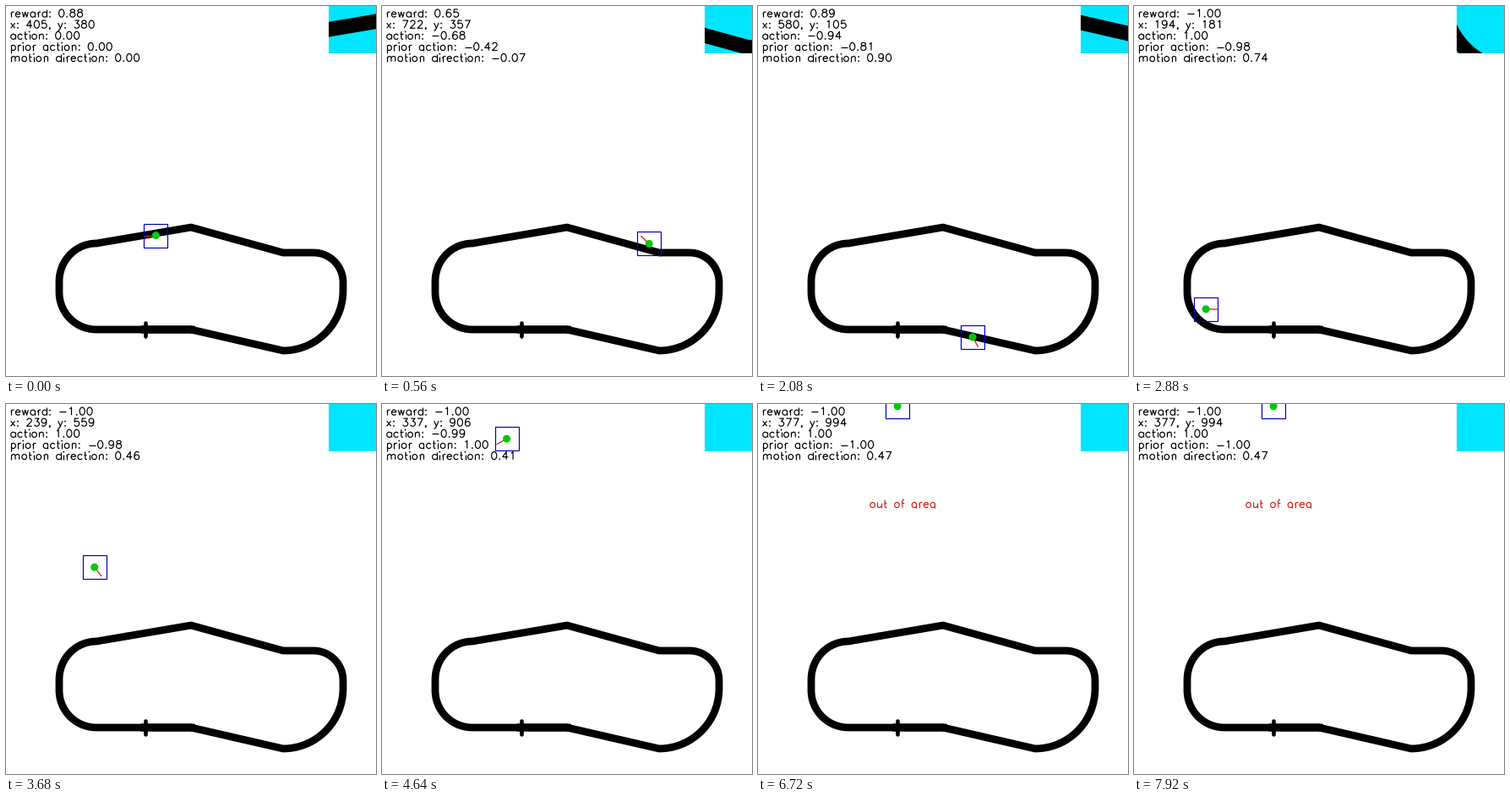
Recreate the animation shown at these times as a matplotlib script. Size 438 by 438 pixels, loop 8 s.

```python
import numpy as np
import matplotlib.pyplot as plt
from matplotlib.animation import FuncAnimation
from matplotlib.collections import LineCollection
from matplotlib.patches import Circle, Rectangle

SIZE, DPI = 438, 100
FRAMES, INTERVAL = 100, 80
SCALE = SIZE / 1000          # world units to pixels
PT = 72 / DPI                # pixels to points
STOP = 64                    # the car leaves the area here
VIEW = 14                    # half width of the sensor window


def arc(cx, cy, rx, ry, start, end):
    t = np.radians(np.linspace(start, end, 25))
    return np.column_stack([cx + rx * np.cos(t), cy + ry * np.sin(t)])


def line(*coords):
    return np.array(coords, float).reshape(-1, 2)


def join(*parts):
    return np.vstack(parts)


def dot(x, y):
    return arc(x, y, .8, .8, 0, 360)


# Single-stroke font: character -> (advance, strokes), baseline at y = 0
def arch(x):
    return join(line(x, 10, x + 3, 13), arc(x + 6.5, 10, 4.5, 4, 115, 0), line(x + 11, 0))


def letters():
    bowl = arc(9.5, 7, 6.5, 7, 35, 325)
    stem = line(4, 14, 4, 0)
    bar = line(2, 14, 9, 14)
    return {
        "a": (19, [bowl, line(15, 14, 15, 0)]),
        "c": (18, [bowl]),
        "d": (19, [bowl, line(15, 21, 15, 0)]),
        "e": (18, [join(line(3, 8, 15, 8), arc(9.3, 7, 6.3, 7, 15, 325))]),
        "f": (12, [join(line(10, 21, 8, 21, 6, 20, 5, 17, 5, 0)), bar]),
        "i": (8, [stem, dot(4, 20.5)]),
        "m": (30, [stem, arch(4), arch(15)]),
        "n": (19, [stem, arch(4)]),
        "o": (19, [arc(9.5, 7, 6.5, 7, 0, 360)]),
        "p": (19, [line(4, 14, 4, -7), arc(9.5, 7, 6.5, 7, 145, -145)]),
        "r": (13, [stem, join(arc(9.5, 8, 5.5, 6, 180, 90), line(12, 14))]),
        "t": (12, [line(5, 21, 5, 4, 6, 1, 8, 0, 10, 0), bar]),
        "u": (19, [join(line(4, 14), arc(8.5, 4, 4.5, 4, 180, 290), line(15, 4)),
                   line(15, 14, 15, 0)]),
        "w": (22, [line(3, 14, 7, 0, 11, 14, 15, 0, 19, 14)]),
        "x": (17, [line(3, 14, 14, 0), line(14, 14, 3, 0)]),
        "y": (16, [line(2, 14, 8, 0), line(14, 14, 8, 0, 6, -4, 4, -6, 1, -7)]),
        " ": (16, []),
        ".": (10, [dot(5, 1)]),
        ":": (10, [dot(5, 13), dot(5, 1)]),
        ",": (10, [dot(5, 1), line(6, 1, 6, -1, 4, -4)]),
        "-": (26, [line(4, 9, 22, 9)]),
    }


def digits():
    six = [arc(10.5, 6.5, 6.5, 6.5, 0, 360),
           join(line(16, 18, 15, 20), arc(11, 10.5, 7, 10.5, 80, 200))]
    strokes = {
        "0": [arc(10, 10.5, 7, 10.5, 0, 360)],
        "1": [line(6, 17, 8, 18, 11, 21, 11, 0)],
        "2": [join(arc(10, 15.5, 6, 5.5, 175, -25), line(13, 10, 3, 0, 17, 0))],
        "3": [join(line(5, 21, 16, 21, 10, 13), arc(10, 6.5, 7, 6.5, 75, -155))],
        "4": [line(13, 0, 13, 21, 3, 7, 18, 7)],
        "5": [join(line(15, 21, 5, 21, 4, 12), arc(10, 7, 7, 7, 135, -155))],
        "6": six,
        "7": [line(3, 21, 17, 21, 7, 0)],
        "8": [arc(10, 17, 6, 4, 0, 360), arc(10, 6.5, 7, 6.5, 0, 360)],
        "9": [np.array([20, 21]) - s for s in six],
    }
    return {char: (20, s) for char, s in strokes.items()}


FONT = {**letters(), **digits()}


def text_strokes(text, x, y):
    """Strokes in pixels for text whose baseline starts at world (x, y)."""
    strokes = []
    for char in text:
        advance, glyph = FONT[char]
        strokes += [(s * [1, -1] + [x, y]) * SCALE for s in glyph]
        x += advance
    return strokes


TRACK = join(
    line(219, 383), arc(107, 339, 44, 44, 90, 180), arc(107, 326, 44, 45, 180, 270),
    line(219, 262, 328, 292), arc(364, 327, 35, 35, -90, 0),
    arc(328, 337, 71, 71, 0, 90), line(219, 383, 164, 383))


def track_distance(p):
    a, b = TRACK[:-1], TRACK[1:]
    d = b - a
    u = np.clip(((p - a) * d).sum(1) / np.maximum((d * d).sum(1), 1e-9), 0, 1)
    return np.hypot(*(a + u[:, None] * d - p).T).min()


# Drive: frame, x, y (world), heading in half turns
DRIVE = np.array([
    (0, 405, 380, 0), (4, 590, 388, -.05), (8, 765, 342, -.08), (10, 850, 305, -.14),
    (13, 927, 204, -.24), (14.5, 931, 160, -.45), (17, 900, 90, -.7),
    (22, 725, 31, -1), (26, 580, 105, -1.1), (33, 290, 125, -1.1),
    (38, 155, 235, -1.4), (44, 210, 484, -1.57), (46, 239, 559, -1.565),
    (58, 337, 906, -1.565), (STOP, 377, 994, -1.555)])
TIMES, POINTS = DRIVE[:, 0], DRIVE[:, 1:3]
VELOCITY = np.gradient(POINTS, TIMES, axis=0)
BANG_START = 34


def position(n):
    n = min(n, STOP)
    i = min(np.searchsorted(TIMES, n, side="right") - 1, len(TIMES) - 2)
    h = TIMES[i + 1] - TIMES[i]
    u = (n - TIMES[i]) / h
    ease = u * u * (3 - 2 * u)
    return (POINTS[i] * (1 - ease) + POINTS[i + 1] * ease
            + h * u * (1 - u) * ((1 - u) * VELOCITY[i] - u * VELOCITY[i + 1]))


def steering(n):
    """Action, prior action and heading at a frame."""
    heading = np.interp(n, TIMES, DRIVE[:, 3])
    if n < BANG_START:
        keys = [0, 3, 6, 10, 13, 17, 22, 26, 30, 34]
        action = np.interp(n, keys, [0, .55, -.6, -.9, -1, -1, -.97, -.94, -.6, -1])
        prior = np.interp(n, keys, [0, .4, -.3, -.8, -1, -1, -.9, -.81, -.7, -.9])
    else:
        low = -.98 if n < 50 else -.99 if n < 60 else -1
        action, prior = (low, 1) if n % 5 in (2, 3) else (1, low)
        heading += .025 * np.sign(action)
    return action, prior, (heading + 1) % 2 - 1


fig = plt.figure(figsize=(SIZE / DPI, SIZE / DPI), dpi=DPI, facecolor="white")
ax = fig.add_axes([0, 0, 1, 1])
ax.set(xlim=(0, SIZE), ylim=(SIZE, 0))
ax.axis("off")
inset = fig.add_axes([382 / SIZE, 382 / SIZE, 56 / SIZE, 56 / SIZE], facecolor="#00e5ff")
inset.set(xticks=[], yticks=[])
for spine in inset.spines.values():
    spine.set_visible(False)

for axes, zoom in ((ax, 1), (inset, 2)):
    axes.plot(*TRACK.T, color="black", lw=8.8 * zoom * PT, solid_joinstyle="round")
    axes.plot([164.5, 164.5], [375, 391], color="black", lw=4.6 * zoom * PT,
              solid_capstyle="round")

hud = ax.add_collection(LineCollection([], colors="black", linewidths=1.2 * PT, zorder=3))
notice = ax.add_collection(LineCollection(
    text_strokes("out of area", 300, 280), colors="#d02010", linewidths=1.2 * PT, zorder=3))
rudder, = ax.plot([], [], color="#e02010", lw=1.3 * PT, zorder=4)
body = ax.add_patch(Circle((0, 0), 4.5, color="#00c80a", lw=0, zorder=5))
window = ax.add_patch(Rectangle((0, 0), 2 * VIEW, 2 * VIEW, fill=False,
                                ec="#0000c0", lw=1.2 * PT, zorder=6))


def update(n):
    x, y = position(n)
    action, prior, heading = steering(n)
    px, py = x * SCALE, SIZE - y * SCALE
    reward = max(-1, .89 - .00069 * track_distance(np.array([px, py])) ** 3)

    rows = [f"reward: {reward:.2f}", f"x: {x:.0f}, y: {y:.0f}", f"action: {action:.2f}",
            f"prior action: {prior:.2f}", f"motion direction: {heading:.2f}"]
    hud.set_segments([s for i, row in enumerate(rows)
                      for s in text_strokes(row, 10, 30 * (i + 1))])

    angle = np.pi * (heading + 1 + action / 4)
    rudder.set_data([px, px + 13 * np.cos(angle)], [py, py - 13 * np.sin(angle)])
    rudder.set_visible(n < STOP)
    notice.set_visible(n >= STOP)
    body.center = px, py
    window.set_xy((px - VIEW, py - VIEW))
    inset.set(xlim=(px - VIEW, px + VIEW), ylim=(py + VIEW, py - VIEW))
    return hud, notice, rudder, body, window


anim = FuncAnimation(fig, update, frames=FRAMES, interval=INTERVAL,
                     init_func=lambda: update(0), repeat=True, repeat_delay=0)
plt.show()
```
